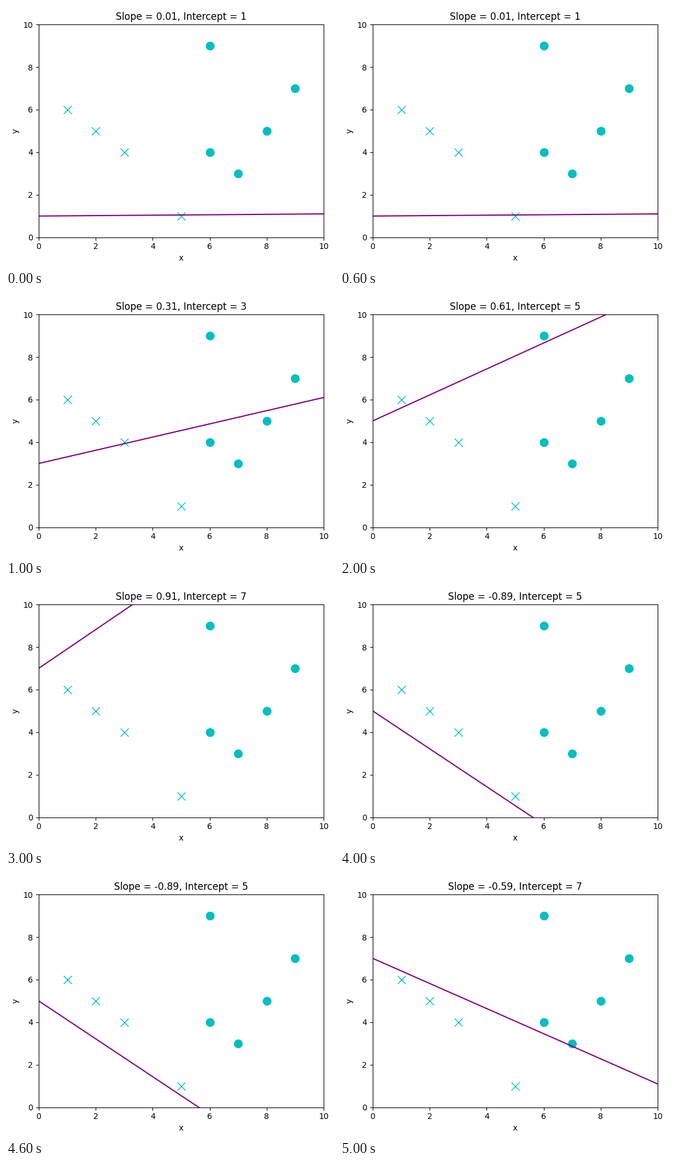
A matplotlib script that plays this animation: 571x455 px, repeating every 6000 ms.

```python
import matplotlib.pyplot as plt
from matplotlib.animation import FuncAnimation

W, H, DPI = 571, 455, 100
AX_W, AX_H = 496, 369.6
PAD = 10  # pixels between the labels and the edge of the stage

crosses = [(1, 6), (2, 5), (3, 4), (5, 1)]
dots = [(6, 4), (7, 3), (8, 5), (9, 7), (6, 9)]

fig = plt.figure(figsize=(W / DPI, H / DPI), dpi=DPI, facecolor="white")


def place(left, bottom):
    return [left / W, bottom / H, AX_W / W, AX_H / H]


left, bottom = 57, 52.8
ax = fig.add_axes(place(left, bottom))
ax.plot(*zip(*crosses), "cx", markersize=10)
ax.plot(*zip(*dots), "co", markersize=10)
line, = ax.plot([0, 10], [0, 0], color="purple", linewidth=1.5)
ax.set(xlim=(0, 10), ylim=(0, 10), xlabel="x", ylabel="y")


def update(i):
    # two runs of rising slope and intercept
    step = i if i < 4 else i - 7
    slope = 0.01 + 0.3 * step
    intercept = 1 + 2 * (i if i < 4 else i - 2)
    line.set_ydata([intercept, intercept + 10 * slope])
    ax.set_title(f"Slope = {slope:.2f}, Intercept = {intercept}")
    return line,


# shift the axes so the labels sit exactly PAD pixels from the left and bottom
update(0)
fig.canvas.draw()
box = fig.get_tightbbox(fig.canvas.get_renderer())
ax.set_position(place(left + PAD - box.x0 * DPI, bottom + PAD - box.y0 * DPI))

anim = FuncAnimation(fig, update, frames=6, interval=1000,
                     init_func=lambda: update(0), repeat=True, repeat_delay=0)
plt.show()
```
